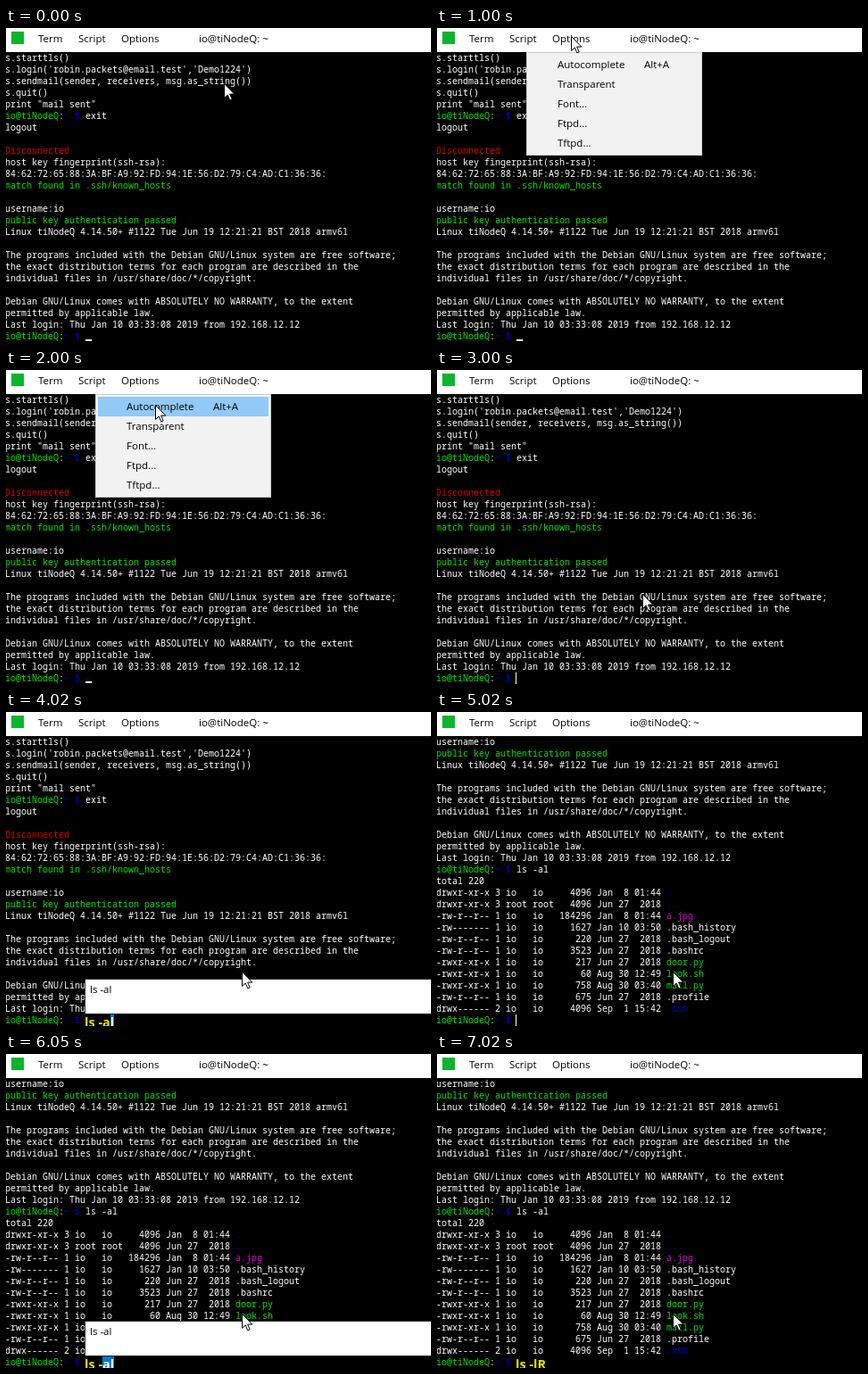
Write an HTML page that moves like this. It is 476x352 px and loops after 8000 ms.

```html
<!DOCTYPE html>
<html lang="en">
<head>
<meta charset="utf-8">
<title>Terminal autocomplete</title>
<style>
html, body { margin: 0; width: 100%; height: 100%; overflow: hidden; background: #000; }
#stage { position: relative; width: 476px; height: 352px; overflow: hidden; background: #000;
  font: 11.5px/22px "Open Sans", "Noto Sans", sans-serif; color: #000; }
#stage > *, #bar > *, #menu span { position: absolute; white-space: pre; }
[hidden] { display: none !important; }
#bar { left: 0; top: 0; width: 476px; height: 27px; background: #fff; }
#bar span { top: 1px; }
#logo { left: 6px; top: 4px; width: 14px; height: 14px; background: #0ab52c; }
#screen { left: -1px; top: 27px; margin: 0; color: #fff;
  font: 500 10px/13px "Noto Sans Mono", "DejaVu Sans Mono", monospace; font-variant-ligatures: none; }
.g { color: #00e600; } .r { color: #d80000; } .b { color: #0000d8; } .m { color: #d800d8; }
#caret { background: #fff; }
#menu { left: 100px; top: 27px; width: 195px; height: 114px; background: #f2f2f2; border: 1px solid #ccc; }
#menu span { left: 34px; }
#highlight { position: absolute; left: 2px; top: 2px; width: 191px; height: 22px; background: #91c9f7; }
#list { left: 88px; top: 299px; width: 382px; height: 38px; padding-left: 5px; background: #fff;
  border: 1px solid #222; border-right: 0; }
#input { left: 88px; top: 339px; width: 388px; height: 13px; background: #000; overflow: hidden;
  color: #e2e200; font-weight: 700; font-size: 14.5px; line-height: 17px; }
#input mark { display: inline-block; background: #0078d7; color: #fff; }
</style>
</head>
<body>
<div id="stage">
  <pre id="screen"></pre>
  <div id="caret"></div>
  <div id="bar">
    <div id="logo"></div>
    <span style="left:36px">Term</span>
    <span style="left:81px">Script</span>
    <span style="left:129px">Options</span>
    <span style="left:216px">io@tiNodeQ: ~</span>
    <svg width="476" height="27" fill="none" stroke="#000">
      <path d="M359 11.5h10M404.5 6.5h9v9h-9zM450 6l10 10M460 6l-10 10"/>
    </svg>
  </div>
  <div id="menu"><div id="highlight"></div></div>
  <div id="list">ls -al</div>
  <div id="input"><span id="typed"></span><mark id="completion"></mark></div>
  <svg id="pointer" width="14" height="21" viewBox="0 0 14 21">
    <path d="M.5.5v16l3.7-3.6 2.6 6 2.4-1-2.6-5.8h5.2z" fill="#fff" stroke="#000"/>
  </svg>
</div>
<script>
const $ = id => document.getElementById(id);
const color = (name, text) => `<span class="${name}">${text}</span>`;
const prompt = color('g', 'io@tiNodeQ') + ':' + color('b', '~ $') + ' ';

const session = [
  's.starttls()',
  "s.login('robin.packets@email.test','Demo1224')",
  's.sendmail(sender, receivers, msg.as_string())',
  's.quit()',
  'print "mail sent"',
  prompt + 'exit',
  'logout',
  '',
  color('r', 'Disconnected'),
  'host key fingerprint(ssh-rsa):',
  '84:62:72:65:88:3A:BF:A9:92:FD:94:1E:56:D2:79:C4:AD:C1:36:36:',
  color('g', 'match found in .ssh/known_hosts'),
  '',
  'username:io',
  color('g', 'public key authentication passed'),
  'Linux tiNodeQ 4.14.50+ #1122 Tue Jun 19 12:21:21 BST 2018 armv6l',
  '',
  'The programs included with the Debian GNU/Linux system are free software;',
  'the exact distribution terms for each program are described in the',
  'individual files in /usr/share/doc/*/copyright.',
  '',
  'Debian GNU/Linux comes with ABSOLUTELY NO WARRANTY, to the extent',
  'permitted by applicable law.',
  'Last login: Thu Jan 10 03:33:08 2019 from 192.168.12.12',
  prompt
];

const file = (mode, links, owner, size, date, name) =>
  [mode, links, owner.padEnd(4), owner.padEnd(4), String(size).padStart(6), date, name].join(' ');

const listing = [
  'ls -al',
  'total 220',
  file('drwxr-xr-x', 3, 'io', 4096, 'Jan  8 01:44', color('b', '.')),
  file('drwxr-xr-x', 3, 'root', 4096, 'Jun 27  2018', color('b', '..')),
  file('-rw-r--r--', 1, 'io', 184296, 'Jan  8 01:44', color('m', 'a.jpg')),
  file('-rw-------', 1, 'io', 1627, 'Jan 10 03:50', '.bash_history'),
  file('-rw-r--r--', 1, 'io', 220, 'Jun 27  2018', '.bash_logout'),
  file('-rw-r--r--', 1, 'io', 3523, 'Jun 27  2018', '.bashrc'),
  file('-rwxr-xr-x', 1, 'io', 217, 'Jun 27  2018', color('g', 'door.py')),
  file('-rwxr-xr-x', 1, 'io', 60, 'Aug 30 12:49', color('g', 'look.sh')),
  file('-rwxr-xr-x', 1, 'io', 758, 'Aug 30 03:40', color('g', 'mail.py')),
  file('-rw-r--r--', 1, 'io', 675, 'Jun 27  2018', '.profile'),
  file('drwx------', 2, 'io', 4096, 'Sep  1 15:42', color('b', '.ssh')),
  prompt
];

const before = session.join('\n');
const after = session.slice(13).join('\n') + listing.join('\n');

['Autocomplete', 'Transparent', 'Font...', 'Ftpd...', 'Tftpd...'].forEach((label, i) => {
  $('menu').insertAdjacentHTML('beforeend', `<span style="top:${2 + 22 * i}px">${label}</span>`);
});
$('menu').insertAdjacentHTML('beforeend', '<span style="left:131px;top:2px">Alt+A</span>');

const steps = [
  { at: 0, pointer: [244, 62], underline: true },
  { at: 1000, pointer: [150, 9], underline: true, menu: true },
  { at: 2000, pointer: [167, 39], underline: true, menu: true, highlight: true },
  { at: 3000, pointer: [230, 251] },
  { at: 4020, pointer: [264, 291], list: true, typed: 'ls -a', completion: 'l' },
  { at: 5020, pointer: [264, 291], done: true },
  { at: 6050, pointer: [264, 291], done: true, list: true, typed: 'ls -', completion: 'al' },
  { at: 7020, pointer: [264, 291], done: true, typed: 'ls -lR' }
];

function place(element, left, top, width, height) {
  Object.assign(element.style, { left: left + 'px', top: top + 'px' });
  if (width) Object.assign(element.style, { width: width + 'px', height: height + 'px' });
}

function show(step) {
  $('screen').innerHTML = step.done ? after : before;
  $('menu').hidden = !step.menu;
  $('highlight').hidden = !step.highlight;
  $('list').hidden = !step.list;
  $('input').hidden = !step.typed;
  $('typed').textContent = step.typed || '';
  $('completion').textContent = step.completion || '';
  place($('pointer'), ...step.pointer);
  if (step.underline) place($('caret'), 89, 349, 7, 2);
  else place($('caret'), 88, 339, 1, 13);
}

let current;
function tick() {
  const time = performance.now() % 8000;
  const step = steps.findLast(s => s.at <= time);
  if (step !== current) show(current = step);
  requestAnimationFrame(tick);
}
tick();
</script>
</body>
</html>
```
